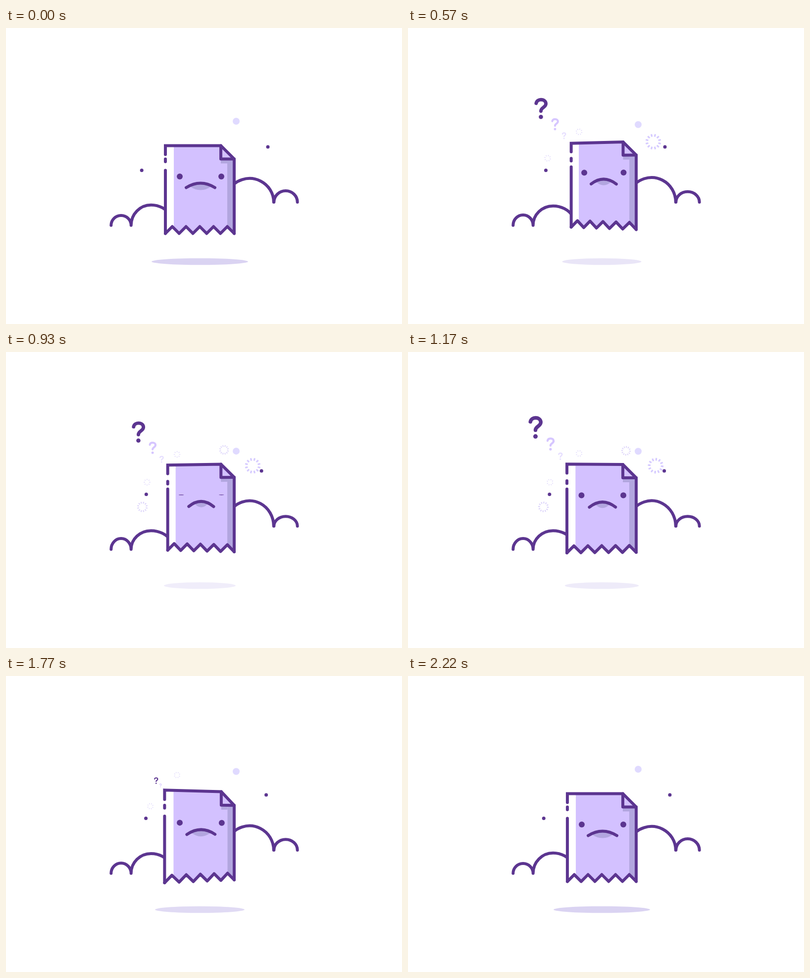
These frames come from a looping animation (800 px wide and 600 px high, 2250 ms). An HTML page with a canvas:

```html
<!DOCTYPE html>
<html lang="en">
<head>
<meta charset="utf-8">
<title>Sad paper</title>
<style>
html, body { margin: 0; width: 100%; height: 100%; overflow: hidden; background: #fff; }
canvas { display: block; width: 100vw; height: 100vh; }
</style>
</head>
<body>
<canvas id="stage"></canvas>
<script>
const LOOP = 2250, STEP = 30;
const INK = '#5c3590', FILL = '#d3c1ff', SHADE = '#b2a6df', PALE = '#e0daff';
const canvas = document.getElementById('stage');
const ctx = canvas.getContext('2d');
const dpr = window.devicePixelRatio || 1;
canvas.width = 800 * dpr;
canvas.height = 600 * dpr;

const clamp = p => Math.max(0, Math.min(1, p));
const mix = (a, b, p) => a + (b - a) * p;
const ease = p => (1 - Math.cos(Math.PI * clamp(p))) / 2;
const ramp = (t, from, to) => ease((t - from) / (to - from));
const hump = (t, mid, half) => ease(1 - Math.abs(t - mid) / half);
// Rises to 1 at the peak time, then returns to 0 at the end of the loop.
const swell = (t, peak) => t < peak ? ramp(t, 0, peak) : 1 - ramp(t, peak, LOOP);

const MARKS = [
  { x: 315, y: 218, h: 14, color: '#e6deff' },
  { x: 297, y: 195, h: 25, color: '#d6c6ff' },
  { x: 268.5, y: 163, h: 43, color: INK }
];

// Each ring passes x, y at 1000 ms, moving along dx, dy.
const RINGS = [
  { x: 499, y: 230.5, r: 15.8, dx: 1, dy: 0, from: 300, to: 1410, color: '#d5caff' },
  { x: 345.6, y: 207, r: 6.7, dx: 0, dy: -1, from: 300, to: 1900 },
  { x: 285.5, y: 264, r: 6.7, dx: 1, dy: 0, from: 330, to: 1900 },
  { x: 440.5, y: 199, r: 9.7, dx: 0, dy: 1, from: 630, to: 1740 },
  { x: 275, y: 314, r: 10.7, dx: -1, dy: 0, from: 630, to: 1790 }
];

function stroke(color, width) {
  ctx.strokeStyle = color;
  ctx.lineWidth = width;
  ctx.stroke();
}

function oval(x, y, rx, ry, color) {
  ctx.beginPath();
  ctx.ellipse(x, y, rx, ry, 0, 0, 2 * Math.PI);
  ctx.fillStyle = color;
  ctx.fill();
}

function drawClouds(c) {
  const q = Math.PI / 2;
  const left = 41.3 - 3.6 * c;
  ctx.beginPath();
  ctx.ellipse(232.5, 400, 20.2, 20 + 2 * c, 0, -2 * q, 0);
  ctx.ellipse(293, 400, 40.3, left, 0, -2 * q, -q);
  ctx.ellipse(293, 400, 45, left, 0, -q, -.5);
  stroke(INK, 6);
  ctx.beginPath();
  ctx.ellipse(492, 353, 48.8, 48 + 3.6 * c, 0, -1.7 * q, 0);
  ctx.ellipse(565, 353, 23.7, 23 - 3.3 * c, 0, -2 * q, 0);
  stroke(INK, 6);
}

function drawPaper(t, b) {
  const tilt = -.049 * ramp(t, 0, 690) + .113 * ramp(t, 690, 1620) - .064 * ramp(t, 1620, LOOP);
  const depth = 1 / (1 + tilt) - 1;
  const width = 139 + 106 * tilt - 1390 * tilt * tilt;
  const lift = .5 - 11.5 * b;
  // The sheet turns around its right edge, in perspective.
  const at = (x, y) => {
    const u = (461 - x) / 139, k = 1 + u * depth;
    return [461 - width * u * (1 + depth) / k, 309 + (y - 309) / k + lift];
  };
  const path = (pts, close) => {
    ctx.beginPath();
    pts.forEach(p => ctx.lineTo(...at(...p)));
    if (close) ctx.closePath();
  };
  const shape = (pts, color) => {
    path(pts, true);
    ctx.fillStyle = color;
    ctx.fill();
  };
  const box = (l, t, r, b, color) => shape([[l, t], [r, t], [r, b], [l, b]], color);
  const line = (...pts) => { path(pts); stroke(INK, 6); };

  const tl = [322, 238], fold = [434, 238], inner = [434, 265], tr = [461, 265];
  const teeth = Array.from({ length: 11 }, (_, i) => [461 - 13.9 * i, i % 2 ? 402 : 416]);
  const sheet = [tl, fold, tr, ...teeth];

  shape(sheet, '#fff');
  ctx.save();
  path(sheet, true);
  ctx.clip();
  box(339, 236, 463, 420, FILL);
  box(447, 265, 463, 420, SHADE);
  box(434, 265, 447, 274, SHADE);
  ctx.restore();
  shape([fold, tr, inner], FILL);

  ctx.lineJoin = 'miter';
  line([322, 256], tl, fold, tr, [461, 416]);
  ctx.lineJoin = 'round';
  line(fold, inner, tr);
  const dash = 265 + 7 * b;
  line([322, dash], [322, dash + 5.5]);
  line([322, 288], [322, 416]);
  line(...teeth);

  drawFace(t, b, at);
}

function drawFace(t, b, at) {
  const open = 1 - .9 * hump(t, 930, 100);
  for (const x of [351, 435]) oval(...at(x, 300.5), 5.2 + .8 * open, 6 * open, INK);

  const half = 29 - 3 * b, end = 323 + 1.5 * b;
  const inset = 23 - 8 * b, low = 328 - 2 * b;
  const side = 314 + (end - 314) * (inset / half) ** 2;
  // A parabola over the mouth's centre, from one end to the other.
  const bow = (w, y, peak) => {
    ctx.lineTo(...at(393 - w, y));
    ctx.quadraticCurveTo(...at(393, 2 * peak - y), ...at(393 + w, y));
  };
  ctx.beginPath();
  bow(inset, side, 314);
  bow(-inset, side, low);
  ctx.fillStyle = SHADE;
  ctx.fill();
  ctx.beginPath();
  bow(half, end, 314);
  stroke(INK, 6);
}

function drawMark({ x, y, h, color }, i, t) {
  const delay = 60 * (2 - i);
  const grow = ramp(t, 120 + delay, 480 + delay);
  const drift = ramp(t, 840, 1440);
  const back = clamp((t - 1550) / 305);
  const out = grow * (1 - back);
  if (out < .01) return;
  const far = (.66 + .17 * i) * drift;
  const size = h * (1 + .12 * drift) * out / 43.5;
  const turn = -22 * (hump(t, 1060, 100) + .7 * hump(t, 1560, 60));

  ctx.save();
  ctx.translate(mix(324, x - 19 * far, out), mix(238, y - 18 * far, out));
  ctx.rotate(turn * Math.PI / 180);
  ctx.scale(size, size);
  ctx.beginPath();
  ctx.moveTo(-9.7, -10.5);
  ctx.bezierCurveTo(-8.7, -15.5, -4.5, -18, 0, -18);
  ctx.bezierCurveTo(6, -18, 10.2, -14.5, 10.2, -9.5);
  ctx.bezierCurveTo(10.2, -2, 0, -2, 0, 5.5);
  stroke(color, 7);
  oval(0, 17.5, 4.3, 4.3, color);
  ctx.restore();
}

function drawRing({ x, y, r, dx, dy, from, to, color = '#ddd5fa' }, t) {
  const size = r * ramp(t, from, from + 150) * (1 - ramp(t, to - 150, to));
  if (size < .3) return;
  const ticks = r > 8 ? 12 : 8;
  const move = 8 * (t - 1000) / 1000;
  ctx.save();
  ctx.translate(x + dx * move, y + dy * move);
  ctx.rotate((t - 390) / 12 * Math.PI / 180);
  ctx.beginPath();
  for (let i = 0; i < ticks; i++) {
    const a = i * 2 * Math.PI / ticks, cx = Math.cos(a) * size, cy = Math.sin(a) * size;
    ctx.moveTo(cx * .66, cy * .66);
    ctx.lineTo(cx, cy);
  }
  ctx.lineCap = 'butt';
  stroke(color, .2 * size);
  ctx.restore();
}

function draw(t) {
  ctx.setTransform(dpr, 0, 0, dpr, 0, 0);
  ctx.fillStyle = '#fff';
  ctx.fillRect(0, 0, 800, 600);
  ctx.lineCap = ctx.lineJoin = 'round';

  const b = swell(t, 905), c = swell(t, 1080);
  ctx.globalAlpha = 1 - .6 * b;
  oval(391.5, 473.5, 97.5 - 25 * b, 6.8, '#dad3f2');
  ctx.globalAlpha = 1;

  drawClouds(c);
  RINGS.forEach(ring => drawRing(ring, t));
  oval(465, 189 + 12.5 * c, 7, 7, PALE);
  oval(274.2 + 12.8 * swell(t, 1450), 288.5, 3.5, 3.5, INK);
  oval(529 - 13 * swell(t, 840), 241, 3.5, 3.5, INK);
  MARKS.forEach((mark, i) => drawMark(mark, i, t));
  drawPaper(t, b);
}

function tick() {
  const t = performance.now() % LOOP;
  draw(Math.floor(t / STEP) * STEP);
  requestAnimationFrame(tick);
}
tick();
</script>
</body>
</html>
```
